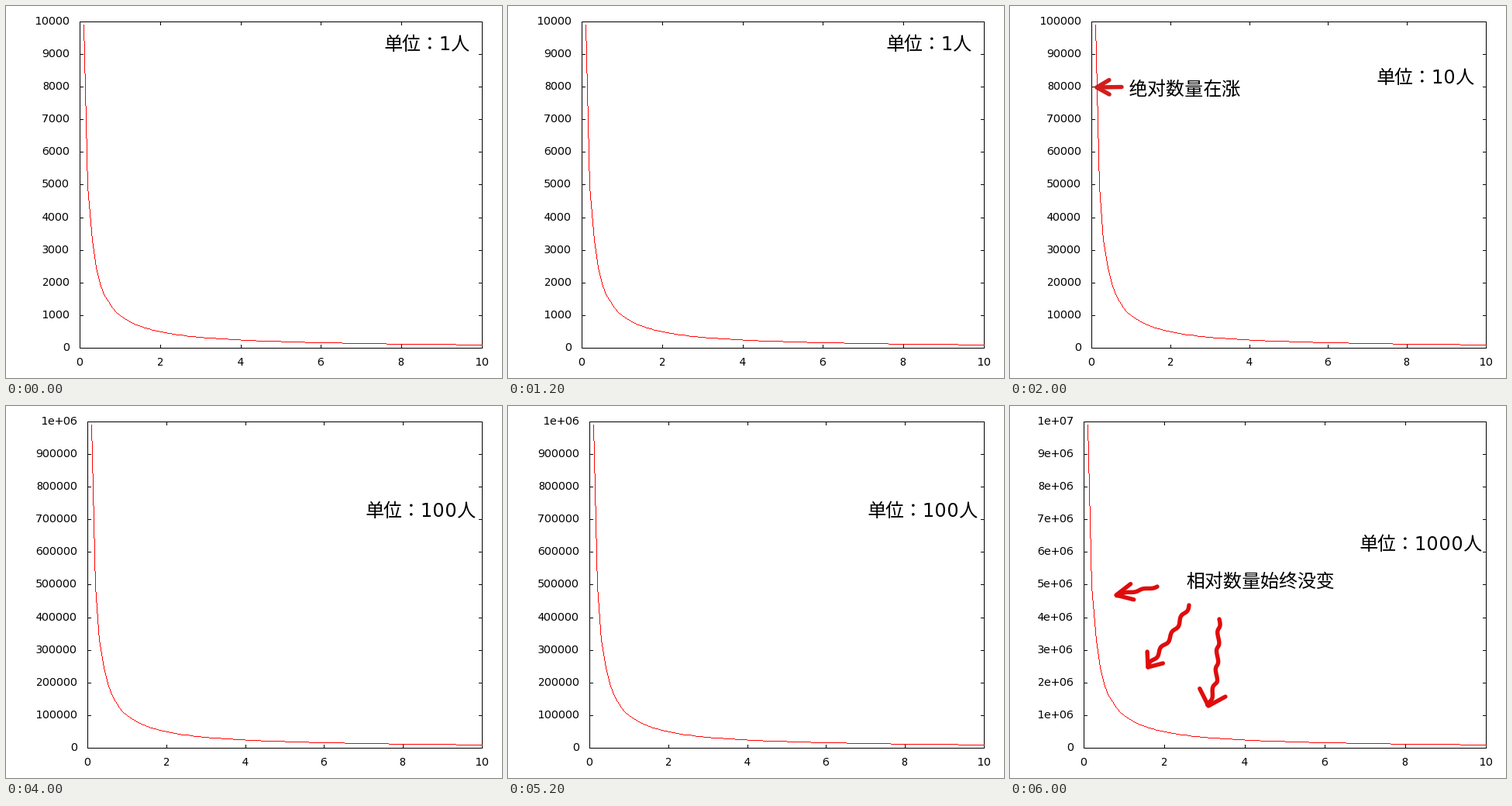
Write a matplotlib script that moves like this. It is 640 px wide and 480 px high and loops after 8000 ms.

```python
import numpy as np
import matplotlib.pyplot as plt
from matplotlib.animation import FuncAnimation

W, H, DPI = 640, 480, 100
PX = 72 / DPI  # one pixel in points
RIGHT, TOP, BOTTOM = 614, 20, 441
UNIT_X = (487, 472, 463, 450)

# Whole-pixel hinting gives thin stems and integer letter widths.
plt.rcParams.update({
    "font.family": ["DejaVu Sans", "Noto Sans CJK JP"],
    "text.hinting": "force_autohint",
    "text.hinting_factor": 1,
})

fig = plt.figure(figsize=(W / DPI, H / DPI), dpi=DPI, facecolor="white")
ax = fig.add_axes([0, 0, 1, 1])


def thin_line(x, y):
    """Straight one-pixel line through pixel centres."""
    ax.plot(np.asarray(x) + 0.5, np.asarray(y) + 0.5, color="black", lw=PX,
            antialiased=False, snap=False, solid_capstyle="projecting")


def label(text, x, y, size=14.1, ha="left"):
    ax.text(x, y, text, fontsize=size * PX, ha=ha, va="baseline")


def draw_axes(left, tick_labels):
    thin_line([left, RIGHT, RIGHT, left, left],
              [TOP, TOP, BOTTOM, BOTTOM, TOP])
    for k, text in enumerate(tick_labels):
        y = round(BOTTOM - (BOTTOM - TOP) * k / 10)
        thin_line([left, left + 4], [y, y])
        thin_line([RIGHT - 4, RIGHT], [y, y])
        label(text, left - 13, y + 4, ha="right")
    for value in range(0, 11, 2):
        x = round(left + (RIGHT - left) * value / 10)
        thin_line([x, x], [TOP, TOP + 4])
        thin_line([x, x], [BOTTOM - 4, BOTTOM])
        label(str(value), x - 0.3, 464, ha="center")


def draw_curve(left):
    """Hyperbola sampled at 99 points and joined pixel by pixel."""
    value = np.linspace(0, 10, 100)[1:]
    xs = np.round(left + (RIGHT - left) * value / 10)
    ys = np.round(BOTTOM - (BOTTOM - TOP) * 0.1 / value)
    pixels = set()
    for x0, y0, x1, y1 in zip(xs, ys, xs[1:], ys[1:]):
        steps = int(max(abs(x1 - x0), abs(y1 - y0))) + 1
        pixels.update(zip(np.round(np.linspace(x0, x1, steps)),
                          np.round(np.linspace(y0, y1, steps))))
    x, y = np.array(sorted(pixels)).T
    ax.hlines(y + 0.5, x + 0.1, x + 0.9, color="red", lw=0.8 * PX,
              antialiased=False, snap=False)


def brush(points, color):
    ax.plot(*np.transpose(points), color=color, lw=5.4 * PX,
            solid_capstyle="round", solid_joinstyle="round")


def arrow(path, barb, spread, color, wobble=0.0):
    """Hand-drawn arrow along path; barbs open by spread degrees."""
    path = np.array(path, float)
    lengths = np.hypot(*np.diff(path, axis=0).T)
    along = np.concatenate([[0], np.cumsum(lengths)])
    s = np.linspace(0, along[-1], 60)
    shaft = np.column_stack([np.interp(s, along, c) for c in path.T])
    brush(shaft + wobble * np.sin(2 * np.pi * s / 24)[:, None], color)

    tip = path[-1]
    back = np.arctan2(*(path[-2] - tip)[::-1])
    angles = back + np.radians([-spread, spread])
    ends = tip + barb * np.column_stack([np.cos(angles), np.sin(angles)])
    brush([ends[0], tip, ends[1]], color)


def draw_rise():
    label("绝对数量在涨", 154, 115, size=24)
    arrow([(144, 104.5), (112, 105)], 18.5, 30, "#d41c1c")


def draw_unchanged():
    label("相对数量始终没变", 228, 234, size=24)
    red = "#e00c0c"
    arrow([(190, 233), (137, 244)], 23.5, 26, red, wobble=0.8)
    arrow([(231, 257), (209, 295), (178, 337)], 20, 39, red, wobble=1.4)
    arrow([(270, 275), (266, 355), (256, 387)], 25, 44, red, wobble=1.4)


NOTES = {1: draw_rise, 3: draw_unchanged}


def draw(i):
    ax.cla()
    ax.set(xlim=(0, W), ylim=(H, 0))
    ax.axis("off")
    unit = 10 ** i
    tick_labels = [f"{1000 * unit * k:g}" for k in range(11)]
    left = 45 + 10 * max(map(len, tick_labels))
    draw_axes(left, tick_labels)
    draw_curve(left)
    label(f"单位：{unit}人", UNIT_X[i], 57 + 43 * i, size=24)
    if i in NOTES:
        NOTES[i]()
    return ()


anim = FuncAnimation(fig, draw, frames=4, interval=2000,
                     init_func=lambda: (), repeat=True, repeat_delay=0)
plt.show()
```
